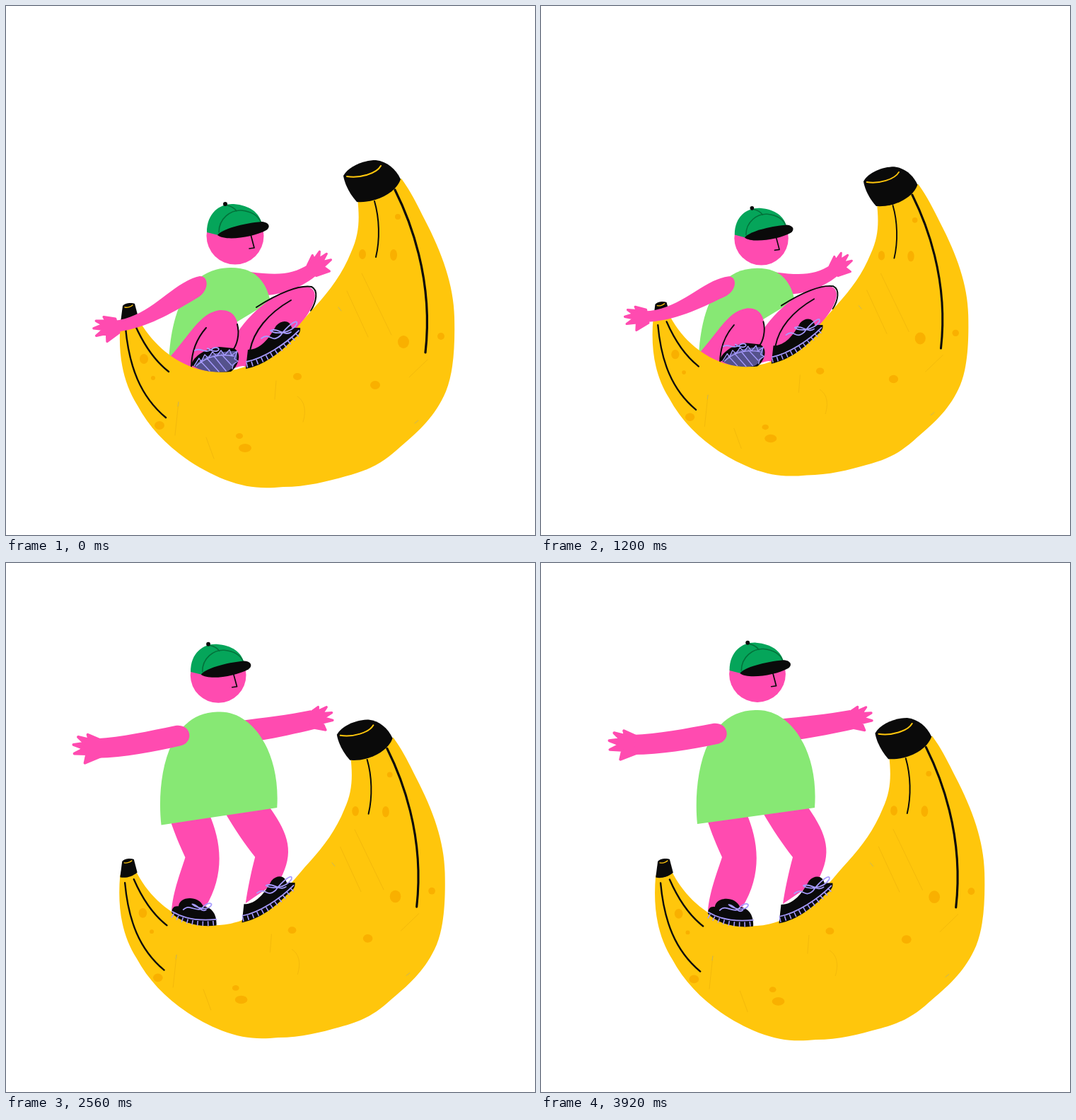
Recreate the animation shown at these times as an HTML page. Size 748 px wide and 748 px high, loop 4 s.

```html
<!DOCTYPE html>
<html lang="en">
<head>
<meta charset="utf-8">
<title>Banana surfer</title>
<style>
html, body { margin: 0; width: 100%; height: 100%; overflow: hidden; background: #fff; }
svg { display: block; width: 100vw; height: 100vh; }
.skin { fill: #ff4bb0; }
.ink { fill: #0a0a0a; }
.line, .lace, .seam, .mark { fill: none; stroke-linecap: round; stroke-linejoin: round; }
.line { stroke: #0a0a0a; stroke-width: 2; }
.lace { stroke: #a79bff; stroke-width: 1.8; }
.seam { stroke: #03713a; stroke-width: 1.6; }
.mark { stroke: #f3b90c; stroke-width: 1; }
.tread { fill: none; stroke: #a79bff; stroke-width: 7; stroke-dasharray: 1.6 6; }
.spots { fill: #f9b000; }
</style>
</head>
<body>
<svg viewBox="0 0 748 748">
<defs>
  <path id="hand" class="skin" stroke="#ff4bb0" stroke-width="4" stroke-linejoin="round"
    d="M4 -12L-14 -20L-12 -13L-28 -17L-19 -8L-35 -6L-20 0L-34 7L-16 8L-19 21L4 12Z"/>
</defs>
<g id="world">
  <g id="armR"><path id="sleeveR" class="skin"/><use id="handR" href="#hand"/></g>
  <path id="body" fill="#87e874"/>
  <g id="legs">
    <path id="legR" class="skin"/>
    <path id="legL" class="skin"/>
    <g id="folds" class="line"><path id="foldR"/><path id="foldL"/><path id="calf"/></g>
    <path id="knee" class="line" d="M354 426C385 406 415 394 432 397C442 402 439 418 431 431"/>
  </g>
  <g id="banana">
    <path fill="#ffc60c" d="M497 272C500 300 500 322 488 348C476 378 458 402 438 424C420 443 400 472 372 492C340 515 310 519 284 516C245 510 205 480 184 436L162 444C158 490 164 530 186 565C210 610 255 648 310 670C340 681 360 683 392 680C425 680 455 672 480 665C520 655 537 642 558 623C585 600 607 580 622 545C633 518 635 480 634 440C633 395 617 350 592 302C580 278 572 262 559 244Z"/>
    <path class="mark" d="M482 403L512 468M503 378L545 465M244 560L239 607M283 610L294 640M412 552C424 560 424 575 420 588M382 530L380 556M596 500L570 525"/>
    <path class="mark" stroke-width="1.5" style="stroke:#c9b45c" d="M470 426L474 431M578 590L583 586M244 560L243 566"/>
    <g id="spots" class="spots"></g>
    <path class="line" stroke-width="2.5" d="M521 276C528 300 529 330 523 355"/>
    <path class="line" style="stroke-width:3.2" d="M550 260C570 300 605 385 593 490"/>
    <path class="line" style="stroke-width:2.4" d="M169 455C174 510 190 552 226 582M182 450C196 482 212 503 230 517"/>
    <path class="ink" d="M477 240C484 227 505 218 523 218C539 220 551 230 558 245C552 263 525 279 496 277C486 266 479 252 477 240Z"/>
    <path class="mark" style="stroke:#ffc60c;stroke-width:2" d="M482 241C500 244 524 237 530 226"/>
    <path class="ink" d="M165 424C168 420 177 419 182 421L187 440C180 446 170 449 162 447Z"/>
    <path class="mark" style="stroke:#ffc60c;stroke-width:1.4" d="M168 426C172 427 177 425 179 423"/>
  </g>
  <g id="shoeR">
    <path class="ink" d="M339 513L342 486C360 486 372 470 382 452C390 443 402 444 404 455L416 455C417 462 413 466 405 472C388 490 365 508 339 513Z"/>
    <path class="lace" d="M340 503C365 498 395 478 414 459"/>
    <path class="tread" d="M340 508C367 502 397 482 415 461"/>
    <path class="lace" d="M361 470C374 460 374 478 388 466C398 452 414 440 411 450C402 464 380 464 374 459C384 454 394 468 403 461"/>
  </g>
  <g id="shoeL">
    <path class="ink" d="M-33 0C-33 -8 -29 -11 -23 -10C-21 -25 6 -26 13 -10C26 -8 33 2 32 18C7 21 -19 14 -33 0Z"/>
    <path class="lace" d="M-32 -2C-12 10 12 11 32 9"/>
    <path class="tread" d="M-32 3C-11 15 11 17 32 14"/>
    <path class="lace" d="M-16 -5C-8 -14 2 -2 10 -6C22 -20 30 -13 21 -8C12 -4 0 -10 -3 -13C6 -12 10 0 17 -5"/>
  </g>
  <g id="sole">
    <path class="ink" d="M262 508C264 495 285 483 302 482L322 484C333 489 331 507 318 517C300 519 280 516 262 508Z"/>
    <path fill="#55528c" d="M267 510C275 495 300 488 325 488C330 495 325 512 312 517C295 519 275 516 267 510Z"/>
    <path class="lace" style="stroke-width:1.4" d="M266 509L273 498L276 503L281 493L286 498L292 489L298 495L304 487L309 494L316 486L319 494L327 488L323 499L328 502L321 507L320 513M275 502L288 516M284 498L301 517M294 495L311 516M305 493L319 508M269 509C285 494 305 492 322 495"/>
    <path class="lace" d="M267 487C276 482 280 492 290 486C298 479 305 486 298 488C292 489 288 486 285 484"/>
  </g>
  <g id="armL"><path id="sleeveL" class="skin"/><use id="handL" href="#hand"/></g>
  <g id="head">
    <circle class="skin" r="40.5"/>
    <path fill="#05a55a" d="M-40 -5C-40 -34 -20 -46 -2 -45C21 -43 34 -33 38 -17C16 -13 -6 -9 -24 -1Z"/>
    <path class="seam" d="M-23 -5C-23 -25 -6 -37 9 -36C26 -34 33 -27 36 -20M-11 -43C-6 -42 -1 -39 2 -35"/>
    <circle class="ink" cx="-14" cy="-45" r="3"/>
    <path class="ink" d="M-25 -1C-20 -9 11 -18 38 -20C49 -19 50 -12 44 -8C26 2 -14 8 -25 -1Z"/>
    <path class="line" style="stroke-width:1.7" d="M22 -2L27 17L20 18"/>
  </g>
</g>
</svg>
<script>
const $ = id => document.getElementById(id);

// Anchor x, anchor y and zoom in which each pose (sit, crouch, stand) is drawn.
const views = [[174, 420, 1], [175, 413, .933], [174, 418, .985]];

const shapes = {
  body: ["M230 505C232 450 248 370 318 370C355 370 368 392 374 418Z",
    "M225 407C238 375 250 284 323 281C370 283 385 330 386 382Z",
    "M221 369C215 310 228 209 303 208C352 205 393 265 387 346Z"],
  sleeveL: ["M152 445C205 440 235 390 274 382C288 382 287 404 270 413C238 432 200 456 155 461Z",
    "M190 382C203 315 215 318 279 294C291 296 290 322 268 334C232 350 234 342 213 392Z",
    "M130 243C165 242 205 234 243 227C266 224 270 252 249 256C210 264 170 271 130 271Z"],
  sleeveR: ["M428 365C405 380 385 381 345 376L368 409C390 408 420 398 441 379Z",
    "M455 320C425 321 395 315 360 298L378 338C400 341 430 343 458 341Z",
    "M437 208C405 214 370 217 335 221L362 250C390 246 415 241 442 235Z"],
  legL: ["M232 496C262 462 275 434 302 430C334 428 334 465 318 505L270 525C262 522 255 518 250 512C244 508 238 502 232 496Z",
    "M225 412C235 392 290 388 318 388C352 394 333 425 313 482L263 488C264 470 268 455 273 444C250 441 225 432 225 412Z",
    "M234 360C255 358 275 356 291 355C306 390 315 438 284 488L236 492C238 465 250 435 256 416C248 398 242 385 234 360Z"],
  legR: ["M322 470C345 430 390 398 420 396C448 397 438 425 412 455L342 512C335 505 328 512 320 512C322 500 325 485 322 470Z",
    "M334 402C355 390 385 377 405 377C432 380 420 408 384 446L330 474C336 455 341 440 348 424C342 426 336 427 331 428Z",
    "M312 350C335 349 358 348 378 346C405 385 412 410 392 448L342 482C345 462 350 438 356 416C342 398 328 378 312 350Z"],
  foldL: ["M283 455C268 472 262 490 262 512", "M288 412C278 430 270 448 268 464", "M290 400C280 420 270 440 268 460"],
  foldR: ["M403 416C370 435 350 460 345 487", "M369 400C355 417 347 432 343 447", "M370 400C360 415 352 430 350 450"],
  calf: ["M327 450C331 465 326 480 321 486", "M334 400C338 412 335 420 332 428", "M305 400C306 410 306 420 303 430"]
};
// Point in each pose, then rotation and size in each pose.
const spots = {
  head: ["324 325", "335.5 235", "306 157"],
  handL: ["154 453", "201 386", "131 257"],
  handR: ["435 372", "456 331", "439 222"],
  shoeL: ["294 500", "292 489", "268.5 496"],
  shoulder: ["272 398", "278 312", "250 242"]
};
const turn = { head: [0, 27, 0], handL: [-15, -85, 0], handR: [-40, -25, -10], shoeL: [-10, -10, 0] };
const size = { handL: [.85, .82, 1], handR: [.8, .65, .85] };

const zoomKeys = [[0, 1, 174, 420], [560, .968, 169, 419], [800, .957, 168, 419], [1120, .946, 169, 419],
  [1600, .933, 175, 413], [2080, .939, 175, 414], [2240, .948, 174, 417], [2560, .973, 173, 418],
  [2800, .985, 174, 416], [3100, .993, 173, 416], [3440, .992, 171, 417], [3920, .985, 174, 418]];
const swayKeys = [[0, 0], [1600, 0], [1920, -2.5], [2080, -2.3], [2560, -.6], [3000, .4], [3440, 1.4], [3920, 0]];
const liftKeys = [[0, 0], [800, 5], [1200, 5], [1600, 0]];

const NUMBER = /-?[\d.]+/g;
const lerp = (a, b, f) => a + (b - a) * f;
const toWorld = (text, pose) => text.match(NUMBER).map((n, i) =>
  views[0][i % 2] + (n - views[pose][i % 2]) / views[pose][2]);

for (const group of [shapes, spots])
  for (const id in group) group[id] = { text: group[id][0], poses: group[id].map(toWorld) };

function blend(values, p) {
  const i = Math.min(1, Math.floor(p)), f = p - i;
  return values[i].map ? values[i].map((v, k) => lerp(v, values[i + 1][k], f)) : lerp(values[i], values[i + 1], f);
}

function track(keys, t) {
  const next = keys.findIndex(k => k[0] > t);
  if (next < 0) return keys.at(-1).slice(1);
  const a = keys[next - 1], b = keys[next], f = (t - a[0]) / (b[0] - a[0]);
  return a.slice(1).map((v, i) => lerp(v, b[i + 1], f));
}

function poseAt(t) {
  if (t < 1200) return 0;
  if (t < 1600) return ((t - 1200) / 400) ** 2;
  return 2 - Math.max(0, 1 - (t - 1600) / 320) ** 2;
}

const move = (id, value) => $(id).setAttribute("transform", value);
const show = (id, on) => $(id).setAttribute("visibility", on ? "visible" : "hidden");

function draw(t) {
  const p = poseAt(t), [zoom, x, y] = track(zoomKeys, t), [sway] = track(swayKeys, t), [lift] = track(liftKeys, t);
  move("world", `translate(${x} ${y}) scale(${zoom}) translate(-174 -420)`);

  for (const id in shapes) {
    const n = blend(shapes[id].poses, p);
    let i = 0;
    $(id).setAttribute("d", shapes[id].text.replace(NUMBER, () => n[i++].toFixed(2)));
  }
  const at = id => blend(spots[id].poses, p);
  const place = (id, mirror = 1) => {
    const s = size[id] ? blend(size[id], p) : 1;
    return `translate(${at(id)}) rotate(${blend(turn[id], p)}) scale(${s * mirror} ${s})`;
  };
  const lean = `rotate(${sway} 306 360) `;
  move("body", lean);
  move("head", lean + `translate(${2 * sway} ${3 * sway}) ` + place("head"));
  move("armL", lean + `rotate(${sway + lift} ${at("shoulder")})`);
  move("armR", lean + `rotate(${sway} 352 232)`);
  move("legs", `rotate(${sway * .6} 300 510)`);
  move("handL", place("handL"));
  move("handR", place("handR", -1));
  move("shoeL", place("shoeL"));

  // The shirt hangs over the legs only when standing.
  $(p > 1.4 ? "body" : "banana").before($("legs"));
  show("sole", p < .3);
  show("shoeL", p >= .3);
  show("knee", p < .1);
  show("folds", p < 1.3);
}

const freckles = [[554, 298, 4, 4], [504, 351, 5, 7], [548, 352, 5, 8], [562, 475, 8, 9], [615, 467, 5, 5],
  [522, 536, 7, 6], [412, 524, 6, 5], [330, 608, 5, 4], [338, 625, 9, 6], [217, 593, 7, 6], [195, 499, 6, 7], [208, 526, 3, 3]];
$("spots").innerHTML = freckles.map(([x, y, rx, ry]) =>
  `<ellipse cx="${x}" cy="${y}" rx="${rx}" ry="${ry}"/>`).join("");

function tick() {
  draw(Math.floor(performance.now() % 4000 / 80) * 80);
  requestAnimationFrame(tick);
}
tick();
</script>
</body>
</html>
```
